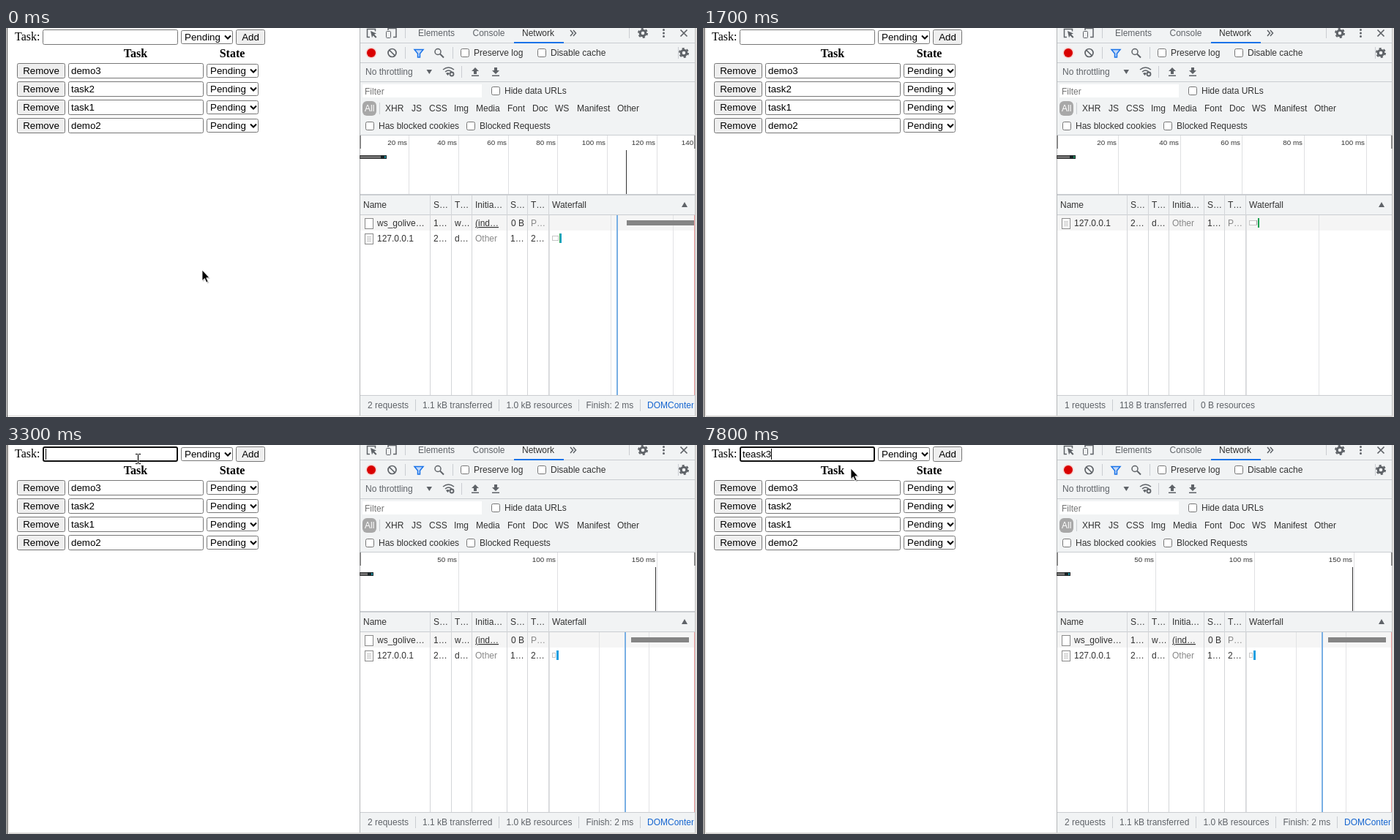
An HTML page that plays this animation: 944 by 532 pixels, repeating every 8000 ms.

```html
<!DOCTYPE html>
<html lang="en">
<head>
<meta charset="utf-8">
<title>Task list</title>
<style>
html, body { margin: 0; width: 100%; height: 100%; overflow: hidden; background: #fff; }
svg { display: block; width: 944px; height: 532px; }
text { font: 12px "Liberation Sans", Arial, sans-serif; white-space: pre; }
.form { font-size: 13.333px; }
.serif { font: 16px "Liberation Serif", "Times New Roman", serif; }
.bold { font-weight: bold; }
.tick { font-size: 9.8px; }
</style>
</head>
<body>
<svg viewBox="0 0 944 532">
  <defs>
    <clipPath id="panel"><rect x="483" width="456.5" height="532"/></clipPath>
    <clipPath id="ruler"><rect x="483" width="457" height="532"/></clipPath>
  </defs>
  <g id="base"></g><g id="frame"></g><g id="net"></g><g id="form"></g><g id="cursor"></g>
</svg>
<script>
const LOOP = 8000, STEP = 100;
const INK = '#333', SOFT = '#5f6368', RULE = '#cacdd1', BAR = '#f1f3f4', EDGE = '#767676';
const $ = id => document.getElementById(id);

const rect = (x, y, w, h, fill, more = '') =>
  `<rect x="${x}" y="${y}" width="${w}" height="${h}" fill="${fill}" ${more}/>`;
const box = (x, y, w, h, fill, stroke, r = 2) =>
  rect(x + .5, y + .5, w - 1, h - 1, fill, `stroke="${stroke}" rx="${r}"`);
const text = (x, y, s, fill = INK, more = '') => `<text x="${x}" y="${y}" fill="${fill}" ${more}>${s}</text>`;
const fillPath = (d, fill = SOFT) => `<path d="${d}" fill="${fill}"/>`;
const line = (d, w = 1.5, stroke = SOFT) => `<path d="${d}" fill="none" stroke="${stroke}" stroke-width="${w}"/>`;
const vline = (x, y, h, color = RULE) => rect(x, y, 1, h, color);
const hline = (y, color = RULE) => rect(483, y, 459, 1, color);
const at = (x, y, s) => `<g transform="translate(${x} ${y})">${s}</g>`;

// Form controls
const formText = (x, y, s) => text(x, y, s, '#000', 'class="form"');
const centred = (x, y, s, cls) => text(x, y, s, '#000', `class="${cls}" text-anchor="middle"`);
const button = (x, y, w, s) => box(x, y, w, 21, '#efefef', EDGE) + centred(x + w / 2, y + 15, s, 'form');
const input = (x, y, s = '', edge = EDGE) => box(x, y, 185, 21, '#fff', edge) + formText(x + 4, y + 15, s);
const select = (x, y, edge = EDGE) => box(x, y, 71, 19, '#fff', edge) + formText(x + 5, y + 14, 'Pending') +
  line(`M${x + 60} ${y + 7.5}l4 4 4-4`, 2, '#000');

// Developer tools pieces
const check = (x, y, s) => box(x, y, 12, 12, '#fff', EDGE) + text(x + 18, y + 10, s);
const gear = (x, y) => `<g fill="none" stroke="${SOFT}"><circle cx="${x}" cy="${y}" r="3.8" stroke-width="3"/>
  <circle cx="${x}" cy="${y}" r="6" stroke-width="2" stroke-dasharray="3.1 3.18"/></g>`;
const page = (y, lined) => box(490, y, 12, 15, '#fff', '#8a8a8a', 0) +
  (lined ? line(`M493 ${y + 4.5}h6m-6 2h6m-6 2h6m-6 2h6`, 1, '#c4c4c4') : '');

function tasks() {
  let s = text(12, 17, 'Task:', '#000', 'class="serif"') + button(314, 2, 40, 'Add') +
    centred(177, 40, 'Task', 'serif bold') + centred(309, 40, 'State', 'serif bold');
  ['demo3', 'task2', 'task1', 'demo2'].forEach((name, i) => {
    const y = 48 + 25 * i;
    s += button(15, y, 66, 'Remove') + input(85, y, name) + select(274, y + 1);
  });
  return s;
}

function tools() {
  let s = rect(483, 0, 459, 530, BAR);
  [20, 47, 73, 146].forEach(y => s += hline(y));

  // Tabs
  s += line('M497 12.5h-3.500v-11h11v3') + fillPath('M498 4l8 3.500-3 1.200 3.500 3.500-1.500 1.500-3.500-3.500-1.500 3z') +
    line('M522 3v-2.500h11v12h-4') + box(519, 4, 7, 10, BAR, SOFT, 1) +
    vline(545, 0, 14) + text(563, 11, 'Elements', SOFT) + text(637.5, 11, 'Console', SOFT) +
    text(705, 11, 'Network') + rect(694, 19, 68, 2, '#1a73e8') +
    line('M771 3l3.500 4-3.500 4m4-8l3.500 4-3.500 4') + vline(851, 0, 14) + gear(870, 7) +
    [2.5, 7, 11.5].map(y => `<circle cx="898.500" cy="${y}" r="1.500" fill="${SOFT}"/>`).join('') +
    line('M921.500 2.500l9 9m0-9l-9 9', 1.7);

  // Recording bar
  s += `<circle cx="499" cy="34" r="7.500" fill="#f6cfcd"/><circle cx="499" cy="34" r="6" fill="#d90000"/>
    <circle cx="527.500" cy="34" r="5.500" fill="none" stroke="${SOFT}" stroke-width="1.700"/>` +
    line('M523.500 30l8 8', 1.7) + vline(545, 26, 16) +
    `<path d="M558 29.500h12l-4.500 5.500v5h-3v-5z" fill="#c3d9f8" stroke="#1a73e8" stroke-width="1.500"/>
    <circle cx="590" cy="32.500" r="4" fill="none" stroke="${SOFT}" stroke-width="1.500"/>` +
    line('M593 35.500l5 5', 2) + vline(610, 26, 16) + check(621, 28, 'Preserve log') +
    check(726, 28, 'Disable cache') + vline(918, 26, 16) + gear(926, 34);

  // Throttling bar
  s += text(491, 64, 'No throttling', SOFT) + fillPath('M574.500 57h7.500l-3.700 6z') +
    line('M597 57q7.500-6 15 0m-12 3q4.500-4 9 0') + fillPath('M601 62q3-2 5 0l-2.500 3z') +
    `<circle cx="609" cy="63" r="2.500" fill="${BAR}" stroke="${SOFT}" stroke-width="1.800"/>` +
    vline(622, 52, 16) + fillPath('M641 54l5 5h-3v4h-4v-4h-3zM636 64.500h10v1.500h-10z') +
    fillPath('M669 63l5-5h-3v-4h-4v4h-3zM664 64.500h10v1.500h-10z');

  // Filters
  s += rect(487, 77, 163, 18, '#fff') + text(490, 91, 'Filter', '#757575') + check(663, 80, 'Hide data URLs') +
    rect(487, 100, 19, 20, '#a8a8a8', 'rx="6"') + text(490, 114, 'All', '#fff') + vline(510, 102, 16);
  Object.entries({ XHR: 518, JS: 554, CSS: 578, Img: 612, Media: 642, Font: 685, Doc: 719, WS: 750, Manifest: 780, Other: 835 })
    .forEach(([name, x]) => s += text(x, 114, name));
  s += check(491, 128, 'Has blocked cookies') + check(629, 128, 'Blocked Requests');

  // Overview, table and footer
  s += rect(484, 147, 457, 80, '#fff') + rect(483, 227, 459, 2, RULE) + rect(484, 256, 457, 246, '#fff') +
    rect(484, 256, 457, 21, '#f5f5f5') + hline(255) + hline(502);
  [579, 608, 636, 684, 712, 741].forEach(x => s += vline(x, 229, 273, '#d3d5d8'));
  Object.entries({ 488: 'Name', 584: 'S…', 613: 'T…', 641: 'Initia…', 689: 'S…', 717: 'T…', 746: 'Waterfall' })
    .forEach(([x, name]) => s += text(x, 246, name));
  return s + fillPath('M923 245h8l-4-7z') + vline(483, 0, 530, '#b4b6b9') + vline(941, 0, 530, '#c4c4c4');
}

// The three network logs: first load, reloading, reloaded
const LOGS = [
  { unit: 20, gap: 67.72, bar: 37, mark: 847, grid: [826, 911], blue: 834, ws: [848, 93], box: 9 },
  { unit: 20, gap: 84.65, bar: 26, grid: [841], box: 11 },
  { unit: 50, gap: 135.4, bar: 19, mark: 887, grid: [810, 878], blue: 845, ws: [854, 79], box: 5 }
];

function network(n) {
  const log = LOGS[n], done = log.ws;
  let s = '<g clip-path="url(#ruler)">';
  for (let i = 1; i * log.gap < 520; i++) {
    const x = Math.floor(483 + i * log.gap);
    s += vline(x, 147, 80, '#dfe0e2') + text(x - 2, 160, i * log.unit + ' ms', INK, 'class="tick" text-anchor="end"');
  }
  s += '</g>' + rect(483, 147, 2, 18, '#888') + rect(940, 147, 2, 18, '#888') +
    rect(483, 174, log.bar, 5, '#444') + rect(484, 176, log.bar - 9, 1, '#aaa') +
    rect(475 + log.bar, 174, 8, 5, '#1d2527') + rect(480 + log.bar, 175, 2, 3, n == 1 ? '#168a5b' : '#1a8a9a');
  if (done) s += vline(log.mark, 167, 60, INK);
  log.grid.forEach(x => s += vline(x, 256, 246, '#e2e3e5'));
  s += vline(742, 256, 246, '#e2e3e5');

  const y = done ? 277 : 256;
  const cells = (y, list) => [507, 584, 613, 641, 689, 717].forEach((x, i) =>
    s += text(x, y, list[i], /Other|P…/.test(list[i]) ? '#888' : INK));
  if (done) {
    s += page(260);
    cells(271, ['ws_golive…', '1…', 'w…', '<tspan text-decoration="underline">(ind…</tspan>', '', 'P…']);
    s += text(708, 271, '0 B', INK, 'text-anchor="end"') + rect(done[0], 263, done[1], 7, '#858585') +
      rect(log.blue, 256, 2, 246, '#78afe4') + vline(940, 256, 246, '#ef9a9a');
  }
  s += page(y + 4, true);
  cells(y + 15, ['127.0.0.1', '2…', 'd…', 'Other', '1…', done ? '2…' : 'P…']);
  s += box(746, y + 7, log.box, 7, '#fff', '#c6c6c6', 0);
  if (n == 0) s += rect(756, y + 4, 1, 13, '#23a455') + rect(757, y + 4, 2, 13, '#10a5c8');
  if (n == 1) s += vline(756, y + 7, 6, '#999') + rect(758, y + 4, 2, 13, '#12a150');
  if (n == 2) s += rect(752, y + 4, 3, 13, '#1a9fe0');

  s += '<g clip-path="url(#panel)">';
  (done
    ? [[494, '2 requests'], [569, '1.1 kB transferred'], [683.5, '1.0 kB resources'], [792.5, 'Finish: 2 ms'], [876, 'DOMContentLoaded: 104 ms']]
    : [[494, '1 requests'], [569, '118 B transferred'], [680, '0 B resources']]
  ).forEach(([x, label], i) => {
    s += text(x, 520, label, i == 4 ? '#1565d0' : SOFT);
    if (i) s += vline(Math.floor(x) - 10, 508, 16);
  });
  return s + '</g>';
}

// Window edges, wider once the page has been reloaded
const edges = late => rect(0, 0, 1, 532, late ? '#dcd9d7' : '#f4f4f4') + rect(1, 0, 1, 532, '#444') +
  (late ? rect(2, 0, 2, 532, '#d8d4d1') : '') + rect(2, 530, 942, late ? 2 : 1, '#d8d6d4') +
  rect(942, 0, 2, 532, '#e3e1df');

// Latest entry of a [time, ...] list
const last = (list, t) => list.reduce((a, b) => b[0] <= t ? b : a);

const TYPED = [[0, ''], [5700, 't'], [5800, 'te'], [6100, 'tea'], [6200, 'teas'], [6400, 'teask'],
  [6700, 'teask2'], [7300, 'teask'], [7400, 'teask2'], [7800, 'teask3']];
// time, x, y, shape, hovered control
const MOVES = [[0, 268, 331, 'arrow'], [100, 269, 312, 'arrow'], [200, 270, 272, 'arrow'], [300, 271, 212, 'arrow'],
  [400, 271, 146, 'arrow'], [500, 271, 84, 'arrow'], [600, 266, 28, 'arrow'], [700, 251, 13, 'arrow', 'select'],
  [800, 222, 8, 'beam', 'input'], [900], [1900, 255, 32, 'arrow'], [2000, 330, 150, 'arrow'],
  [2100, 391, 240, 'arrow'], [2200, 470, 276, 'arrow'], [2300, 527, 282, 'arrow'], [2400, 273, 175, 'arrow'],
  [2700, 238, 104, 'arrow'], [2800, 194, 28, 'arrow'], [2900, 180, 17, 'beam', 'input'],
  [3300, 180, 19, 'beam', 'input'], [3400, 192, 26, 'arrow'], [3500, 202, 32, 'arrow']];
const SHAPES = {
  arrow: `<path d="M1 2V16L4.500 13 7 18.500 9.500 17.500 7 12H11Z" fill="#000" opacity=".2"/>
    <path d="M0 0V14.500L3.400 11.500 5.800 17 8 16 5.700 10.700H10Z" stroke="#fff" stroke-width=".8"/>`,
  beam: line('M-3-6.500h2.500l1 1 1-1h2.500M-3 6.500h2.500l1-1 1 1h2.500M.5-5.500v11', 2.5, '#ddd') +
    line('M-3-6.500h2.500l1 1 1-1h2.500M-3 6.500h2.500l1-1 1 1h2.500M.5-5.500v11', 1, '#000')
};

function entry(t, hover) {
  const edge = name => hover == name ? '#4f4f4f' : EDGE;
  let s = select(239, 3, edge('select'));
  if (t < 3100) return s + input(50, 2, '', edge('input'));
  const word = last(TYPED, t)[1];
  s += rect(51, 3, 183, 19, '#fff', 'stroke="#101010" stroke-width="2" rx="2"') + formText(54, 17, word);
  const lit = word || Math.floor((t - 3100) / 600) % 2 == 0;
  const widths = { t: 3.7, s: 6.67, k: 6.67 };
  const end = [...word].reduce((x, c) => x + (widths[c] || 7.41), 54);
  return s + (lit ? vline(Math.floor(end), 5, 15, '#000') : '');
}

const cache = {};
function put(id, html) {
  if (cache[id] !== html) $(id).innerHTML = cache[id] = html;
}

put('base', tasks() + tools());
function draw(now) {
  const t = Math.floor(now % LOOP / STEP) * STEP;
  const [, x, y, shape, hover] = last(MOVES, t);
  put('frame', edges(t >= 1600));
  put('net', network(t < 1600 ? 0 : t < 1800 ? 1 : 2));
  put('form', entry(t, hover));
  put('cursor', shape ? at(x, y, SHAPES[shape]) : '');
  requestAnimationFrame(draw);
}
draw(0);
</script>
</body>
</html>
```
